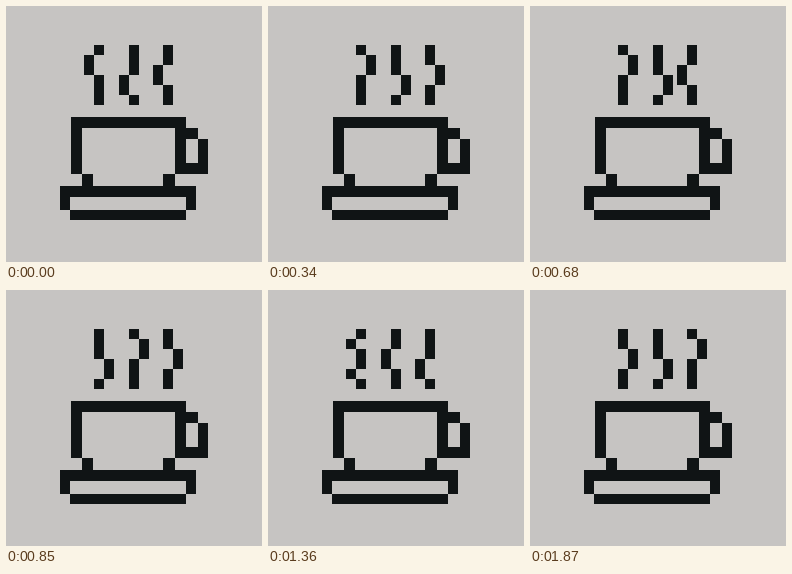
Animation of 256x256 px, one loop 2.04 s. Source, as an HTML page:

```html
<!DOCTYPE html>
<html lang="en">
<head>
<meta charset="utf-8">
<title>Steaming cup</title>
<style>
  html, body { margin: 0; width: 100%; height: 100%; overflow: hidden; background: #c6c4c2; }
  svg { display: block; width: 100%; height: 100%; }
  path { fill: #101415; }
</style>
</head>
<body>
<svg viewBox="0 0 256 256" shape-rendering="crispEdges">
  <!-- cup, feet, handle, saucer -->
  <path d="M65 111H180V168H169V122H76V168H65Z
           M76 168H87V180H76Z M157 168H169V180H157Z
           M180 122H192V133H180Z M192 133H202V168H169V157H192Z"/>
  <path fill-rule="evenodd" d="M54 180H190V204H180V214H64V204H54Z M64 191H180V204H64Z"/>
  <path id="steam"/>
</svg>
<script>
const STEP = 170, UNIT = 10, TOP = 39;
// Each pose: side of the bend, and the row where the two-cell bend begins (wraps after 4).
const plumes = [
  { x: 88,  poses: 'L0 R2 R0 L2 R0 R2 L3 R1 L3 R1 L3 R1'.split(' ') },
  { x: 123, poses: 'L2 R0 R2 L0 R2 R0 L0 R2 L1 R3 L0 R2'.split(' ') },
  { x: 157, poses: 'L1 R3 R1 L3 L1 R1 L2 R0 L2 R0 L2 R0'.split(' ') }
];
const steam = document.getElementById('steam');

const cell = (x, row) => `M${x} ${TOP + row * UNIT}h${UNIT}v${UNIT}h-${UNIT}z`;

function plumePath({ x, poses }, step) {
  const [side, start] = poses[step];
  const shift = side === 'L' ? -UNIT : UNIT;
  let d = cell(x, 0) + cell(x, 5);
  for (let row = 0; row < 4; row++) {
    const bent = (row - start + 4) % 4 < 2;
    d += cell(bent ? x + shift : x, row + 1);
  }
  return d;
}

function draw(now) {
  const step = Math.floor(Math.max(0, now - begin) / STEP) % 12;
  steam.setAttribute('d', plumes.map(p => plumePath(p, step)).join(''));
  requestAnimationFrame(draw);
}

const begin = performance.now();
draw(begin);
</script>
</body>
</html>
```
